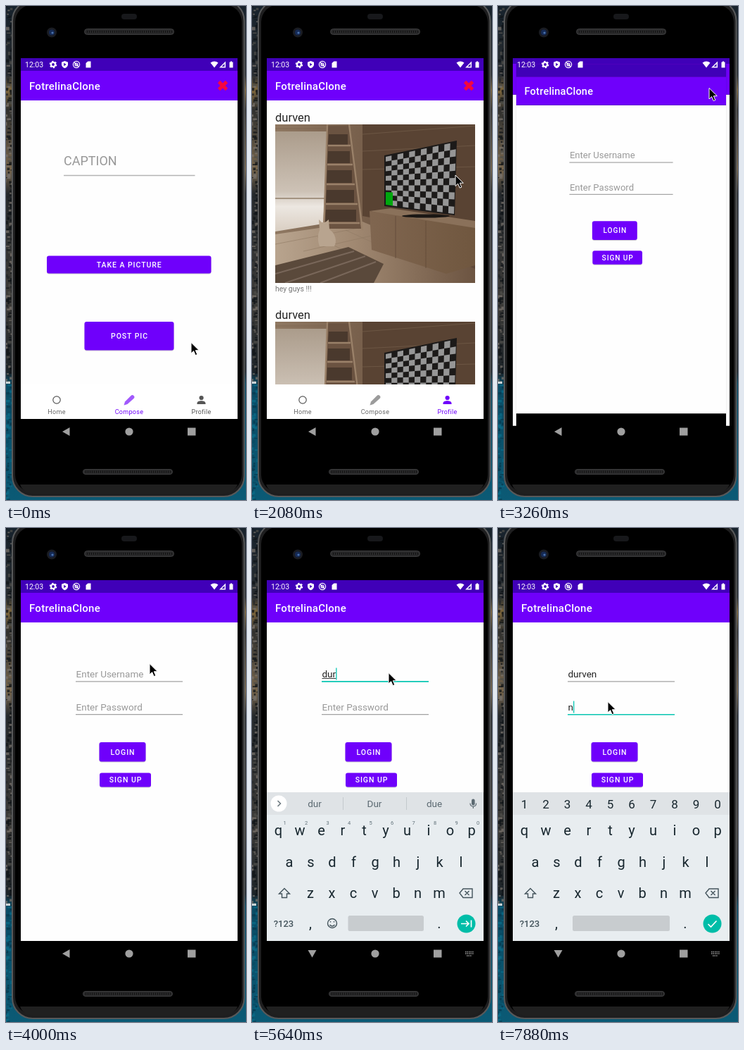
An HTML page for the animation above (8000 ms loop, 341x701 px).

```html
<!DOCTYPE html>
<html lang="en">
<head>
<meta charset="utf-8">
<title>Photo app login</title>
<style>
html, body { margin: 0; width: 100%; height: 100%; overflow: hidden; background: #000; }
svg { display: block; width: 341px; height: 701px; font-family: Roboto, sans-serif; }
.mid { text-anchor: middle; }
.title { font-size: 15px; font-weight: 500; letter-spacing: .25px; fill: #fff; }
.btn { font-size: 10.5px; font-weight: 500; letter-spacing: .94px; fill: #fff; text-anchor: middle; }
.tab { font-size: 9px; letter-spacing: .3px; text-anchor: middle; }
.field { font-size: 13.5px; }
.name { font-size: 16.5px; fill: #222; }
.note { font-size: 10.5px; fill: #777; }
.key { font-size: 20px; fill: #17262e; text-anchor: middle; }
.sup { font-size: 7.5px; fill: #607078; text-anchor: middle; }
.word { font-size: 13.5px; fill: #5c6a72; text-anchor: middle; }
</style>
</head>
<body>
<svg viewBox="0 0 341 701">
<defs>
  <clipPath id="screen"><rect x="21" y="74" width="308" height="545"/></clipPath>
  <clipPath id="feedArea"><rect x="21" y="134" width="308" height="403"/></clipPath>
  <clipPath id="tabArea"><rect x="21" y="537" width="308" height="49"/></clipPath>
  <clipPath id="photoArea"><rect width="284" height="225"/></clipPath>
  <linearGradient id="cliff" x2="0" y2="1">
    <stop offset="0" stop-color="#17222c"/><stop offset=".14" stop-color="#272c30"/>
    <stop offset=".17" stop-color="#80683c"/><stop offset=".21" stop-color="#30302e"/>
    <stop offset=".33" stop-color="#78664c"/><stop offset=".38" stop-color="#25292c"/>
    <stop offset=".6" stop-color="#3d3b38"/><stop offset=".74" stop-color="#1c2328"/>
    <stop offset=".765" stop-color="#0a4c66"/><stop offset="1" stop-color="#0b5a75"/>
  </linearGradient>
  <linearGradient id="wall"><stop offset="0" stop-color="#8f7862"/><stop offset=".44" stop-color="#775f4b"/><stop offset="1" stop-color="#5e4737"/></linearGradient>
  <linearGradient id="pane" x2="0" y2="1"><stop offset="0" stop-color="#ab9c8b"/><stop offset=".6" stop-color="#cdc2b6"/><stop offset=".75" stop-color="#ece7e1"/><stop offset="1" stop-color="#d9cec2"/></linearGradient>
  <linearGradient id="floor"><stop offset="0" stop-color="#b8a48e"/><stop offset=".4" stop-color="#a08871"/><stop offset="1" stop-color="#6c5441"/></linearGradient>
  <linearGradient id="front"><stop offset="0" stop-color="#806650"/><stop offset="1" stop-color="#70573f"/></linearGradient>
  <g id="room" clip-path="url(#photoArea)">
    <path fill="url(#wall)" d="M0 0H284V225H0z"/>
    <path fill="#594333" d="M124 0H284V160L124 130z"/>
    <path stroke="#7a6350" stroke-width=".6" d="M0 6H124M124 14L284 2M124 38L284 30M124 64L284 60"/>
    <path fill="url(#pane)" d="M0 10H74V140L0 152z"/>
    <path fill="#a39381" d="M0 104H70V106H0z"/>
    <path fill="url(#floor)" d="M0 156L124 138L284 205V225H0z"/>
    <path stroke="#8f7963" stroke-width=".6" d="M0 170L124 146M40 180L150 155M60 160L150 205M100 150L210 200"/>
    <path fill="#5a493b" d="M0 200L104 174L154 198L140 225H0z"/>
    <path stroke="#79675a" stroke-width="2" d="M0 212L112 180M14 225L128 187M64 225L143 195"/>
    <path fill="#6b5341" d="M74 2H106L122 148H68z"/>
    <path fill="#4a392d" d="M76 14h27v15H75zM75 38h31v17H74zM74 65h35v18H73zM73 93h39v18H72zM72 121h43v17H71z"/>
    <path stroke="#9a8169" stroke-width="2.400" fill="none" d="M74 0L69 151M105 0L124 150M75 30H107M74 57H110M73 85H113M72 113H117M71 140H120"/>
    <path fill="#8a715a" d="M134 123L164 119L284 137V147L277 154z"/>
    <path fill="url(#front)" d="M134 123L284 147V200L243 212L137 178z"/>
    <path stroke="#614a39" stroke-width=".8" d="M171 130V190M214 137V204" fill="none"/>
    <path fill="#b8a48f" d="M63 150l-1-15 4 4h5l5-4 1 14c9 6 11 17 7 24H63c-3-8-3-16 0-23z"/>
    <ellipse cx="214" cy="130" rx="34" ry="2.600" fill="#1b1714"/>
    <path fill="#1c1a19" d="M155 44L258 23L255 129L155 116z"/>
    <g id="checks"/>
    <path fill="#00a80e" d="M157 96l10 .5v19L157 114z"/>
  </g>
  <g id="bar">
    <path fill="#4000b8" d="M21 74H329V92H21z"/>
    <path fill="#6f00fb" d="M21 92H329V134H21z"/>
    <text class="title" x="33" y="119">FotrelinaClone</text>
  </g>
</defs>

<rect width="341" height="701" fill="url(#cliff)"/>
<g id="rocks"/>
<rect x="9" y="-8" width="329.500" height="704" rx="29" fill="#1e1e1f" stroke="#58595a" stroke-width="2"/>
<rect x="13" y="-2" width="322" height="692" rx="25" fill="#000"/>
<path d="M20 679Q24 691 40 692H308Q324 691 329 679" fill="#202020"/>
<rect x="164" y="11" width="22" height="8" rx="4" fill="#17181b"/>
<circle cx="65" cy="37.500" r="7" fill="#1a1c22"/><circle cx="65" cy="37.500" r="4" fill="#152a55"/><circle cx="66" cy="38" r="1.600" fill="#4a73ae"/>
<g fill="#29292a" stroke="#3d3d3e"><rect x="111.500" y="32.500" width="127" height="8" rx="4"/><rect x="109.500" y="657.500" width="127" height="7" rx="3.500"/></g>
<path stroke="#111" stroke-width="3" stroke-dasharray="1 2" d="M115 36.500H236M113 661H234"/>

<g clip-path="url(#screen)">
  <g id="main">
    <path fill="#fefefe" d="M21 134H329V586H21z"/>
    <use href="#bar"/>
    <circle id="crossRipple" cx="308" cy="113" fill="#fff" opacity=".2"/>
    <path stroke="#f5063f" stroke-width="4.800" d="M302.500 107.500L313.500 118.500M313.500 107.500L302.500 118.500"/>
    <g id="compose">
      <text x="82" y="225.500" font-size="18" fill="#989898">CAPTION</text>
      <path stroke="#b4b4b4" stroke-width="1.500" d="M82 240.500H268.500"/>
      <g id="composeButtons"/>
    </g>
    <g id="feed" clip-path="url(#feedArea)">
      <text class="name" x="33" y="163.500">durven</text>
      <use href="#room" x="33" y="168"/>
      <text class="note" x="33" y="404.500">hey guys !!!</text>
      <text class="name" x="33" y="443.500">durven</text>
      <use href="#room" x="33" y="448"/>
    </g>
    <path fill="#fff" d="M21 537H329V586H21z"/>
    <g clip-path="url(#tabArea)"><circle id="tabRipple" cx="277.500" cy="562" r="51.500" fill="#6f00fb"/></g>
    <circle cx="72" cy="559" r="5.200" fill="none" stroke="#555" stroke-width="1.200"/>
    <text class="tab" x="72" y="578.500" fill="#666">Home</text>
    <g id="composeTab"><path opacity=".65" d="M167.500 566.500l1.500-5 8.500-8.500q2-2 4 0t0 4l-9 8z"/><text class="tab" x="175" y="578.500">Compose</text></g>
    <g id="profileTab"><path d="M274.500 556a3.100 3.100 0 1 1 6.200 0a3.100 3.100 0 1 1-6.200 0M271.500 565v-1.500c0-4.500 12-4.500 12 0v1.500z"/><text class="tab" x="277.500" y="578.500">Profile</text></g>
  </g>

  <g id="login">
    <path d="M21 74H329V619H21z"/>
    <path fill="#fefefe" d="M21 134H329V586H21z"/>
    <use href="#bar"/>
    <g id="user"/>
    <g id="pass"/>
    <g id="loginButtons"/>
  </g>

  <g id="keyboard">
    <path fill="#e8edf0" d="M21 375H329V586H21z"/>
    <path fill="#dfe3e6" d="M21 375H329V407H21z"/>
    <g id="keys"/>
    <g id="strip">
      <circle cx="38" cy="391" r="11.500" fill="#fff"/>
      <path d="M36.500 387l4 4-4 4" fill="none" stroke="#68757c" stroke-width="1.500"/>
      <rect x="312" y="384.500" width="4.600" height="9" rx="2.300" fill="#5c6a72"/>
      <path d="M310 390.500c0 6 8.600 6 8.600 0M314.300 395v3" fill="none" stroke="#5c6a72" stroke-width="1.200"/>
      <g id="words"><path stroke="#c3c9cd" d="M129.500 382V400M219.500 382V400"/>
        <text class="word" x="89" y="396"/><text class="word" x="174" y="396"/><text class="word" x="259" y="396"/></g>
    </g>
    <g id="digits"/>
    <g fill="none" stroke="#44545c" stroke-width="1.400">
      <path d="M46 511.500l7.500 7.500h-4v5.500h-7V519h-4z"/>
      <path d="M295 518l5-6h13v12.500h-13zM302.500 515l6 6M308.500 515l-6 6"/>
      <g id="smile"><circle cx="114" cy="561" r="6.500"/><path d="M110.500 563q3.500 4 7 0M111.500 558v1.500M116.500 558v1.500"/></g>
    </g>
    <rect id="space" y="550" height="22" rx="2.500" fill="#c8cccf"/>
    <circle cx="304.500" cy="561.500" r="13" fill="#00bda8"/>
    <g fill="none" stroke="#fff" stroke-width="1.700">
      <path id="next" d="M297 561.500h11M304 557.500l4 4-4 4M311.500 556.500v10"/>
      <path id="done" d="M298.500 562l4 4 8-8.500"/>
    </g>
  </g>
</g>

<g fill="#9f9f9f">
  <path id="back" d="M80 604L90.500 598V610z"/>
  <circle cx="175" cy="604" r="5.600"/>
  <path d="M258 598.500h11.500v11H258z"/>
  <path id="imeIcon" fill="none" stroke="#9f9f9f" stroke-width="1.500" stroke-dasharray="1.500 1" d="M303 601.500h11.500M303 604h11.500M305 607h7.500"/>
</g>
<g fill="#fff">
  <text x="27" y="87" font-size="10.500">12:03</text>
  <circle cx="67" cy="83" r="3" fill="none" stroke="#fff" stroke-width="2.200"/>
  <circle cx="67" cy="83" r="4.500" fill="none" stroke="#fff" stroke-width="1.600" stroke-dasharray="2.350 2.350"/>
  <path d="M83.500 78l4.500 1.800v3.500q-.5 3.500-4.500 5-4-1.500-4.500-5v-3.500z"/><path fill="#4000b8" d="M82.200 80.800l3.500 2.200-3.500 2.200z"/>
  <g fill="none" stroke="#fff" stroke-width="1.200"><circle cx="100" cy="83" r="4.600"/><circle cx="100" cy="83" r="2"/><path d="M97 80l6 6"/></g>
  <path d="M113.500 81l3-2.500h4v9h-7z"/>
  <path d="M290.500 80.500q5.500-4 11 0l-5.500 7zM312 78.500v9h-9zM317.500 79.500h1.500v-1h2v1h1.500v8h-5z"/>
  <path fill="#4000b8" d="M310.500 82v4h-4z"/>
</g>
<path id="cursor" d="M0 0V15.500l3.600-3.400 2.600 6 2.600-1.100-2.500-5.800h5z" stroke="#fff" stroke-width="1"/>
</svg>

<script>
const LOOP = 8000;
const NAME = 'durven';
const PURPLE = '#6f00fb', TEAL = '#08c6b2';
const $ = id => document.getElementById(id);
const show = (id, on) => $(id).style.display = on ? '' : 'none';
const clamp = v => Math.max(0, Math.min(1, v));
const easeOut = (t, start, length, power) => 1 - (1 - clamp((t - start) / length)) ** power;

const button = (x, y, w, h, label) =>
  `<rect x="${x}" y="${y + 1}" width="${w}" height="${h}" rx="3" opacity=".18"/>
   <rect x="${x}" y="${y}" width="${w}" height="${h}" rx="3" fill="${PURPLE}"/>
   <text class="btn" x="${x + w / 2 + .5}" y="${y + h / 2 + 3.8}">${label}</text>`;
$('composeButtons').innerHTML = button(58, 354.5, 233.5, 25, 'TAKE A PICTURE') + button(111.5, 448, 127, 40.5, 'POST PIC');
$('loginButtons').innerHTML = button(132.5, 304, 66, 27.5, 'LOGIN') + button(133, 347.4, 73, 20, 'SIGN UP');

const row = (chars, x, y, cls = 'key', size = '') =>
  [...chars].map((c, i) => `<text class="${cls}" x="${x + i * 30.5}" y="${y}" ${size}>${c}</text>`).join('');
$('keys').innerHTML = row('qwertyuiop', 37.5, 435.6) + row('asdfghjkl', 53, 480.5) + row('zxcvbnm', 83, 524.5) +
  row(',', 83, 568) + row('.', 266, 568) +
  '<text class="mid" x="45" y="566" font-size="13" font-weight="500" fill="#44545c">?123</text>';
$('strip').innerHTML += `<g>${row('1234567890', 46.5, 421, 'sup')}</g>`;
$('digits').innerHTML = row('1234567890', 37.5, 398, 'key', 'style="font-size:17px"');

// Rock and water texture around the phone
let seed = 11;
const random = () => (seed = seed * 16807 % 2147483647) / 2147483647;
const rockTones = ['#0d1216', '#101519', '#4d4c49', '#77716a', '#222629'], seaTones = ['#06384e', '#0a6c88', '#084a62'];
$('rocks').innerHTML = Array.from({length: 260}, (_, i) => {
  const y = i * 2.7, tones = y < 536 ? rockTones : seaTones;
  return `<rect x="${random() * 9 - 2}" y="${y}" width="${2 + random() * 4}" height="${1 + random() * 4}" fill="${tones[Math.floor(random() * tones.length)]}" opacity=".75"/>`;
}).join('') + '<path fill="#c9d3d6" d="M0 533h6v3H0z"/>';

// Checkerboard in perspective, interpolated between the screen's corners
const point = (u, v) => [157 + u * (100 - 3 * v), 46 + v * 68 + u * (-21 + v * 34)];
const COLS = 12, ROWS = 10;
let light = '';
for (let r = 0; r < ROWS; r++) for (let c = r % 2; c < COLS; c += 2) {
  const corners = [[c, r], [c + 1, r], [c + 1, r + 1], [c, r + 1]];
  light += 'M' + corners.map(([a, b]) => point(a / COLS, b / ROWS).map(n => n.toFixed(1))).join('L') + 'z';
}
$('checks').innerHTML = `<path fill="#969696" d="${light}"/>`;

for (const [id, textY, lineY] of [['user', 212, 217.9], ['pass', 259, 264.7]]) {
  $(id).innerHTML = `<text class="field" x="99.500" y="${textY}"/>
    <path d="M99 ${lineY}H251"/>
    <path stroke="#222" stroke-width=".9"/>
    <path stroke="${TEAL}" stroke-width="1.300" d="M0 ${textY - 13.5}v17"/>`;
}

function drawField(id, value, hint, focused, composing, caretOn) {
  const [text, line, under, caret] = $(id).children;
  text.textContent = value || hint;
  text.setAttribute('fill', value ? '#222' : '#999');
  line.setAttribute('stroke', focused ? TEAL : '#8c8c8c');
  line.setAttribute('stroke-width', focused ? 1.6 : 1);
  const end = 99.5 + (value ? text.getComputedTextLength() : 0);
  under.setAttribute('d', composing && value ? `M99.500 213.500H${end}` : '');
  caret.setAttribute('transform', `translate(${end + .7} 0)`);
  caret.style.display = focused && caretOn ? '' : 'none';
}

// The picture is refreshed in bursts: [first, last, count]
const ticks = [[0, 0, 1], [300, 730, 4], [1480, 1480, 1], [1780, 2820, 8], [2960, 4000, 8], [4150, 5190, 8],
  [5340, 5640, 3], [5940, 6090, 2], [6540, 6540, 1], [6840, 7440, 5], [7880, 7880, 1]]
  .flatMap(([a, b, n]) => Array.from({length: n}, (_, i) => n > 1 ? Math.round((a + (b - a) * i / (n - 1)) / 10) * 10 : a));
const typing = [5340, 5490, 5640, 5940, 6090, 6540];
const guesses = [['Due', 'down'], ['Due', 'dust'], ['Dur', 'due'], ['Durven', 'during'], ['Durven', 'driven'], ['Durven', 'driven']];
const FOCUS_USER = 4690, FOCUS_PASS = 7290, PASS_KEY = 7880;
const edits = [FOCUS_USER, ...typing, FOCUS_PASS, PASS_KEY];

// Pointer path: [time, x, y]
const route = [[0, 263, 477.5], [160, 263, 477.5], [730, 276, 568.5], [1300, 276, 568.5], [1480, 277, 568.5], [1780, 277, 568.5],
  [2080, 289, 240], [2370, 296, 172], [2820, 300, 116.5],
  [3410, 300, 116.5], [4000, 204, 192.5], [4590, 194, 205.5], [6700, 194, 205.5], [7140, 156, 246.5], [LOOP, 156, 246.5]];
function cursorAt(t) {
  const i = route.findIndex(p => p[0] > t), [a, ax, ay] = route[i - 1], [b, bx, by] = route[i];
  const k = (t - a) / (b - a);
  return [ax + (bx - ax) * k, ay + (by - ay) * k];
}
const zoom = s => `translate(175 346.500) scale(${s}) translate(-175 -346.500)`;

function draw(t) {
  const profile = t >= 1780;
  show('compose', !profile);
  show('feed', t >= 1930);
  $('composeTab').setAttribute('fill', profile ? '#666' : PURPLE);
  $('profileTab').setAttribute('fill', profile ? PURPLE : '#555');
  $('tabRipple').setAttribute('opacity', profile ? .12 * clamp((2080 - t) / 300) : 0);
  show('crossRipple', t >= 2960 && t < 3200);
  $('crossRipple').setAttribute('r', 15 * clamp((t - 2860) / 200));

  const open = easeOut(t, 3132, 400, 4);
  show('main', open < 1);
  show('login', open > 0);
  $('main').setAttribute('transform', zoom(1 + .05 * open));
  $('login').setAttribute('transform', zoom(.85 + .15 * open));

  const count = typing.filter(x => x <= t).length, typed = NAME.slice(0, count);
  const onPass = t >= FOCUS_PASS;
  const caretOn = (t - edits.filter(x => x <= t).pop()) % 1000 < 500;
  drawField('user', typed, 'Enter Username', t >= FOCUS_USER && !onPass, !onPass, caretOn);
  drawField('pass', t >= PASS_KEY ? 'n' : '', 'Enter Password', onPass, false, caretOn);

  const rise = easeOut(t, 4835, 200, 2), numeric = t >= 7440;
  show('keyboard', rise > 0);
  $('keyboard').setAttribute('transform', `translate(0 ${62 * (1 - rise)})`);
  $('keyboard').setAttribute('opacity', clamp(1.47 * rise));
  $('back').setAttribute('transform', `rotate(${-90 * clamp(rise * 1.6)} 85.500 604)`);
  show('imeIcon', rise > 0);
  show('strip', !numeric);
  show('digits', numeric);
  show('smile', !numeric);
  show('next', !numeric);
  show('done', numeric);
  $('space').setAttribute('x', numeric ? 106 : 136.5);
  $('space').setAttribute('width', numeric ? 138 : 107.5);
  show('words', count > 0);
  if (count) [typed, ...guesses[count - 1]].forEach((w, i) => $('words').children[i + 1].textContent = w);

  $('cursor').setAttribute('transform', `translate(${cursorAt(t)})`);
}

let last = -1;
function frame() {
  const now = performance.now() % LOOP;
  const t = ticks.filter(x => x <= now).pop();
  if (t !== last) draw(last = t);
  requestAnimationFrame(frame);
}
frame();
</script>
</body>
</html>
```
